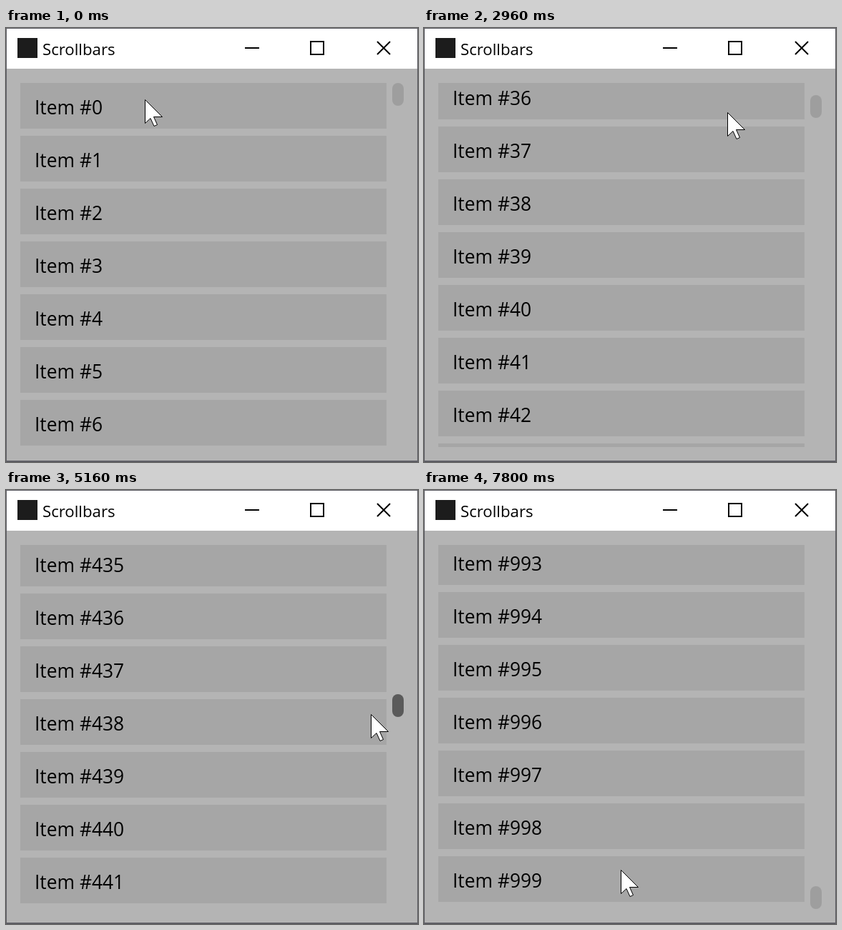
Recreate the animation shown at these times as an HTML page with a canvas. Size 576 by 608 pixels, loop 8 s.

```html
<!DOCTYPE html>
<html lang="en">
<head>
<meta charset="utf-8">
<title>Scrollbars</title>
<style>
html, body { margin: 0; width: 576px; height: 608px; overflow: hidden; }
canvas { display: block; }
</style>
</head>
<body>
<canvas id="stage" width="576" height="608"></canvas>
<script>
const g = document.getElementById('stage').getContext('2d');
const LOOP = 8000, FPS = 0.03; // frames per millisecond
const TOP = 77, VIEW = 510, PITCH = 74, COUNT = 1000;
const MAX = COUNT * PITCH - VIEW, THUMB = 32, TRACK = VIEW - THUMB;
const NOTCH = 76.48, GRAB_Y = 100, DRAG_LAG = 85, DRAG_END = 6700;

// Waypoints of the pointer: time, x, y.
const path = [
  [2640, 194, 100], [2960, 424, 118], [3100, 470, 129], [3400, 530, 96], [3630, 541, GRAB_Y],
  [4150, 541, GRAB_Y], [4660, 525, 191], [5660, 500, 433], [6480, 494, 560], [6560, 494, 561],
  [DRAG_END, 493, 564], [7080, 493, 564], [7350, 400, 521], [7600, 275, 530], [7800, 275, 532]
];

const ramp = (t, from, to) => Math.min(1, Math.max(0, (t - from) / (to - from)));

// Smooth, monotone interpolation of one waypoint column.
function along(t, col) {
  const last = path.length - 1;
  t = Math.min(path[last][0], Math.max(path[0][0], t));
  const rate = i => (path[i + 1][col] - path[i][col]) / (path[i + 1][0] - path[i][0]);
  const slope = i => {
    if (i === 0 || i === last) return 0;
    const a = rate(i - 1), b = rate(i);
    return a * b > 0 ? 2 * a * b / (a + b) : 0;
  };
  let i = 0;
  while (t > path[i + 1][0]) i++;
  const h = path[i + 1][0] - path[i][0], u = (t - path[i][0]) / h, v = 1 - u;
  return Math.round(
    v * v * ((1 + 2 * u) * path[i][col] + u * h * slope(i)) +
    u * u * ((1 + 2 * v) * path[i + 1][col] - v * h * slope(i + 1)));
}

// Three spins of the wheel, then the thumb follows the pointer.
function scrollAt(t) {
  const notches = 7 * ramp(t, 720, 960) + 7 * ramp(t, 1155, 1400) + 21 * ramp(t, 1597, 2100);
  const wheel = Math.ceil(NOTCH * notches);
  if (t < path[5][0]) return wheel;
  const moved = along(Math.min(t - DRAG_LAG, DRAG_END), 2) - GRAB_Y;
  return Math.round(Math.min(MAX, wheel + moved * MAX / TRACK));
}

function rect(color, x, y, w, h) {
  g.fillStyle = color;
  g.fillRect(x, y, w, h);
}

function text(str, x, y, size) {
  g.fillStyle = '#000';
  g.font = `${size}px "Open Sans", "Noto Sans", sans-serif`;
  g.fillText(str, x, y);
}

function drawWindow() {
  rect('#5f5f66', 0, 0, 576, 608);
  rect('#b4b4b4', 1, 57, 574, 549);
  rect('#fff', 1, 1, 574, 56);
  rect('#1c1c1c', 16, 14, 28, 28);
  text('Scrollbars', 51, 38, 22.2);
  rect('#000', 334, 27, 20, 2);
  g.strokeStyle = '#000';
  g.lineWidth = 2;
  g.strokeRect(426, 19, 18, 18);
  g.stroke(new Path2D('M519 19L537 37M537 19L519 37'));
}

function drawList(scroll) {
  g.save();
  g.beginPath();
  g.rect(20, TOP, 512, VIEW);
  g.clip();
  for (let i = Math.floor(scroll / PITCH); i < COUNT; i++) {
    const y = TOP + i * PITCH - scroll;
    if (y > TOP + VIEW) break;
    rect('#a6a6a6', 20, y, 512, 64);
    text('Item #' + i, 40, y + 44, 26.4);
  }
  g.restore();
}

function drawThumb(scroll, alpha) {
  g.fillStyle = `rgba(0,0,0,${alpha})`;
  g.beginPath();
  g.roundRect(540, TOP + Math.round(scroll / MAX * TRACK), 16, THUMB, 8);
  g.fill();
}

const arrow = new Path2D('M.5 .5V33.5L8 26.5L13 37.5L17.5 35.5L12.5 24.5H24.5Z');

function drawMouse(x, y) {
  g.save();
  g.translate(x, y);
  g.fillStyle = '#fff';
  g.lineWidth = 1;
  g.fill(arrow);
  g.stroke(arrow);
  g.restore();
}

function frame(now) {
  // Hold each pose for one step of 30 frames per second.
  const t = Math.floor((now % LOOP + 7) * FPS) / FPS - 6.67;
  const scroll = scrollAt(t);
  drawWindow();
  drawList(scroll);
  drawThumb(scroll, 0.12 + 0.38 * (ramp(t, 3770, 3860) - ramp(t, 7090, 7400)));
  drawMouse(along(t, 1), along(t, 2));
  requestAnimationFrame(frame);
}
requestAnimationFrame(frame);
</script>
</body>
</html>
```
